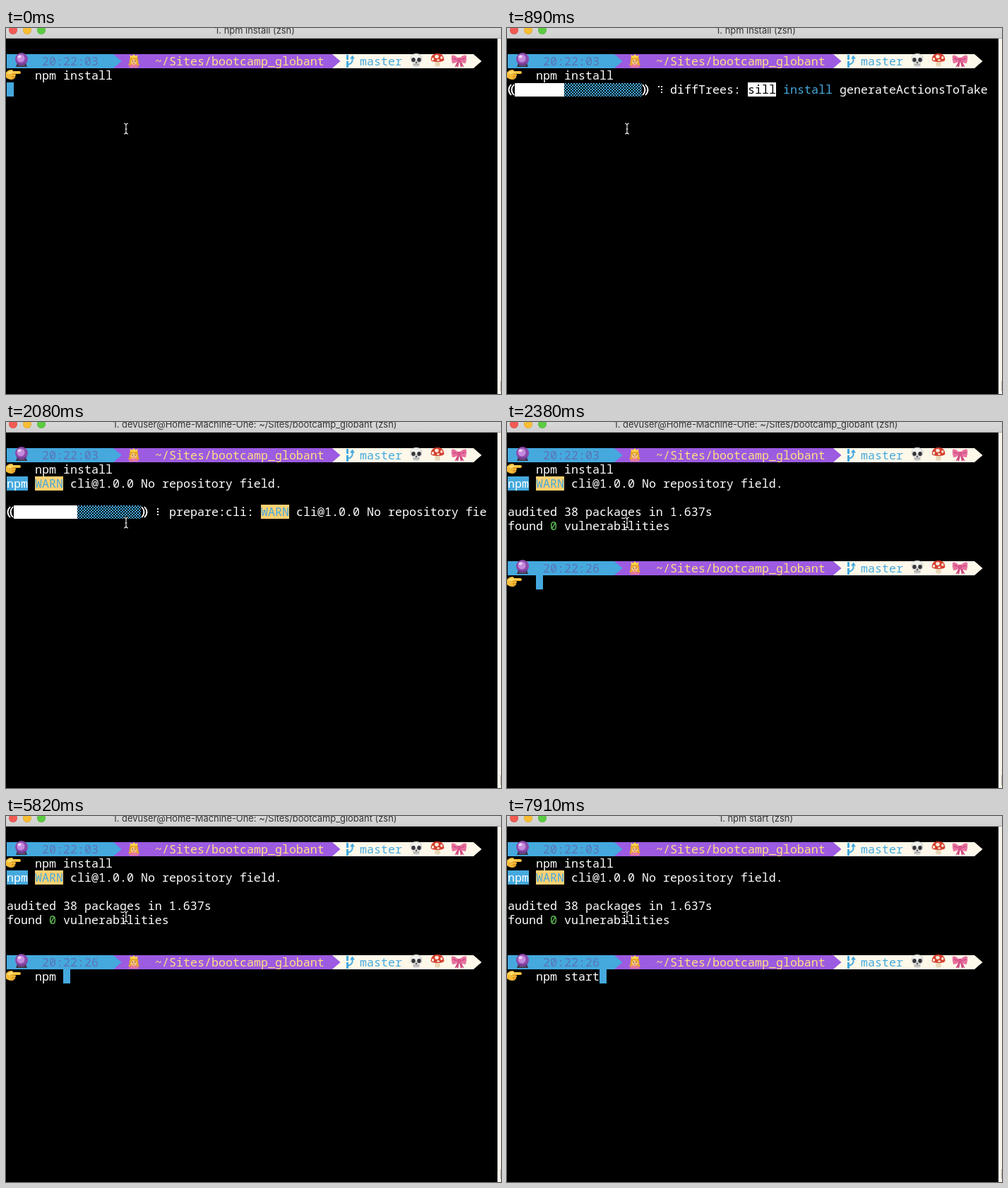
An HTML page with a canvas for the animation above (8000 ms loop, 701 by 518 pixels).

```html
<!DOCTYPE html>
<html lang="en">
<head>
<meta charset="utf-8">
<title>Terminal</title>
<style>
  html, body { margin: 0; width: 100%; height: 100%; overflow: hidden; background: #000; }
  canvas { display: block; }
</style>
</head>
<body>
<canvas id="stage" width="701" height="518"></canvas>
<script>
const ctx = document.getElementById('stage').getContext('2d');
const LOOP = 8000, CELL = 10, ROW = 20, LEFT = 1, TOP = 37;
const MONO = '500 16.667px "Noto Sans Mono", "DejaVu Sans Mono", monospace';
const BLUE = '#45a9de', PURPLE = '#9c5be1', CREAM = '#fdf8ea', YELLOW = '#fed172', WHITE = '#fff';

const colX = col => LEFT + col * CELL;
const rowY = row => TOP + row * ROW;

function rect(x, y, w, h, color) {
  ctx.fillStyle = color;
  ctx.fillRect(x, y, w, h);
}

function fillPath(path, color) {
  ctx.fillStyle = color;
  ctx.fill(new Path2D(path));
}

function strokePath(path, color, width) {
  ctx.strokeStyle = color;
  ctx.lineWidth = width;
  ctx.stroke(new Path2D(path));
}

function write(col, row, text, color = WHITE, back) {
  if (back) rect(colX(col), rowY(row), text.length * CELL, ROW, back);
  ctx.font = MONO;
  ctx.textAlign = 'left';
  ctx.fillStyle = color;
  ctx.fillText(text, colX(col), rowY(row) + 16);
  return col + text.length;
}

const oval = (x, y, rx, ry = rx) =>
  `M${x - rx} ${y}a${rx} ${ry} 0 1 0 ${2 * rx} 0a${rx} ${ry} 0 1 0 ${-2 * rx} 0z`;

// Each icon is a stack of filled paths in a 20 by 20 box.
const icons = {
  ball: [
    ['#3d3040', 'M4 14H16L18 19H2z'],
    ['#8c4aa8', oval(10, 8, 9)],
    ['#6d3590', 'M2 12Q10 18 18 12Q15 17.500 10 17Q5 17.500 2 12z'],
    ['#c48add', oval(9, 7, 5.5)],
    ['#f0d3f5', oval(7, 4.5, 2.6, 2)],
    ['#75608a', 'M5 16.500H15V17.500H5z']
  ],
  princess: [
    ['#e9a92b', 'M4 8Q4 2 10 2Q16 2 16 8Q16 13 18 16H2Q4 13 4 8z'],
    ['#e578a0', 'M3 19Q4 14 10 14Q16 14 17 19z'],
    ['#f8c98c', oval(10, 10, 4.3, 5)],
    ['#e9a92b', 'M5 10Q5 4 11 5Q15 6 15 10Q11 9 9 6.500Q8 9 5 10z'],
    ['#ffd74a', 'M5 5L4.500 1L7.500 3L10 0L12.500 3L15.500 1L15 5z'],
    ['#633a20', oval(8.3, 10, .8) + oval(11.8, 10, .8)],
    ['#c4513f', 'M8 12.500H12Q10 14.500 8 12.500z']
  ],
  skull: [
    ['#d9d9d6', 'M1.500 8Q1.500 0 10 0Q18.500 0 18.500 8Q18.500 12 15 13.500V17Q14 19 10 19Q6 19 5 17V13.500Q1.500 12 1.500 8z'],
    ['#f1f1ed', oval(9.5, 5, 6.5, 4)],
    ['#34343a', oval(6, 9, 2.7, 3) + oval(14, 9, 2.7, 3)],
    ['#34343a', 'M10 11L11.300 14H8.700z'],
    ['#77777a', 'M6 15.500H14V16.300H6z']
  ],
  mushroom: [
    ['#e8d6b5', 'M7 10H13L14 17Q10 20 6 17z'],
    ['#d6402f', 'M.5 9Q1 0 10 0Q19 0 19.500 9Q19 12 10 12Q1 12 .5 9z'],
    ['#f7eadb', oval(9, 4.5, 2.8, 2.4) + oval(15.8, 6, 1.7, 2.1) + oval(3.5, 8, 1.7, 1.9) + oval(11, 9.5, 2, 1.2)]
  ],
  bow: [
    ['#cf4c82', 'M9 9L4 19L7 17L9 19L11 10L13 19L15 17L18 19L13 9z'],
    ['#e8719f', 'M10 7Q4 0 0 2Q-1 7 1 13Q6 13 10 9Q15 13 20 13Q22 7 21 2Q17 0 10 7z'],
    ['#b93a70', 'M9 8L2 5L3 7zM12 8L19 5L18 7z'],
    ['#d9558b', oval(10.5, 8, 2.8, 3.2)]
  ],
  hand: [
    ['#f6bb36', 'M0 6Q3 2 8 2Q10 2 10 4H19Q21 4 21 6Q21 8 19 8H13Q15 10 13 11Q14 13 12 14Q11 16 8 16Q3 16 0 13z'],
    ['#ffdb6b', 'M2 6Q6 3 9 4L10 5H19V6H10L7 8H2z'],
    ['#b9761d', 'M7 9Q8 8 13 8V8.800H8zM8 11H13V11.800H8zM8 13.500H12V14.300H8z']
  ]
};

function icon(name, x, y) {
  ctx.save();
  ctx.translate(x, y);
  for (const [color, path] of icons[name]) fillPath(path, color);
  ctx.restore();
}

function segment(x, end, y, color) {
  fillPath(`M${x} ${y}H${end}L${end + 11.5} ${y + 10}L${end} ${y + 20}H${x}z`, color);
}

function branch(x, y) {
  ctx.save();
  ctx.translate(x, y);
  rect(1, 1, 3, 7, BLUE);
  rect(1, 10, 3, 9, BLUE);
  strokePath('M3 15Q9.500 13 9.500 9V5', BLUE, 2);
  fillPath('M6 6.500L9.500 1.500L13 6.500z', BLUE);
  ctx.restore();
}

function prompt(row, time) {
  const y = rowY(row);
  segment(462, 662, y, CREAM);
  segment(152, 462, y, PURPLE);
  segment(LEFT, 152, y, BLUE);
  icon('ball', 12, y - 1);
  write(5, row, time, '#5b74b3');
  icon('princess', 171, y);
  write(21, row, '~/Sites/bootcamp_globant', '#ffdf83');
  branch(481, y);
  write(50, row, 'master', BLUE);
  icon('skull', 571, y - 1);
  icon('mushroom', 601, y - 1);
  icon('bow', 631, y);
  icon('hand', 0, y + ROW);
}

const cursor = (col, row) => rect(colX(col), rowY(row), CELL, ROW, BLUE);

const checker = (() => {
  const tile = document.createElement('canvas');
  tile.width = tile.height = 4;
  const pen = tile.getContext('2d');
  pen.fillStyle = BLUE;
  pen.fillRect(0, 0, 2, 2);
  pen.fillRect(2, 2, 2, 2);
  return ctx.createPattern(tile, 'repeat');
})();

// Dots are listed as [column, line] inside the spinner cell.
const spinners = {
  start: [[0, 0], [1, 0], [0, 1], [0, 2]],
  turn: [[0, 0], [1, 0], [1, 1]],
  right: [[0, 0], [1, 0], [1, 1], [1, 2]],
  left: [[0, 0], [0, 1], [0, 2]]
};

function progress(row, filled, spinner, parts) {
  const y = rowY(row), end = colX(1 + filled);
  for (const dx of [0, 4]) {
    strokePath(`M${6 + dx} ${y + 3}Q${-1 + dx} ${y + 10.5} ${6 + dx} ${y + 18}`, WHITE, 1.8);
    strokePath(`M${192 + dx} ${y + 3}Q${199 + dx} ${y + 10.5} ${192 + dx} ${y + 18}`, WHITE, 1.8);
  }
  rect(11, y + 1, end - 11, 19, WHITE);
  rect(end, y + 1, 191 - end, 19, checker);
  for (const [c, l] of spinners[spinner]) rect(214 + 4 * c, y + 5 + 4 * l, 2, 2, WHITE);
  let col = 23;
  for (const [text, color, back] of parts) col = write(col, row, text, color, back);
}

const SILL = ['sill', '#000', WHITE], WARN = ['WARN', BLUE, YELLOW];
const stages = [
  [600, 2, 1, 'start', [['rollbackFailedOptional: '], ['verb', BLUE], [' npm-session 6fb9']]],
  [740, 2, 2, 'turn', [['loadIdealTree:loadAllDepsIntoIdealTree: '], SILL]],
  [890, 2, 7, 'right', [['diffTrees: '], SILL, [' '], ['install', BLUE], [' generateActionsToTake']]],
  [1190, 4, 9, 'left', [['prepare:cli: '], WARN, [' cli@1.0.0 No repository fie']]]
];

// Number of characters of the command on screen from each moment on.
const COMMAND = 'npm start';
const keys = [[2380, 0], [4480, 1], [4630, 2], [5080, 3], [5820, 4], [6720, 5], [7320, 6], [7470, 8], [7770, 9]];

const latest = (list, t) => list.filter(item => t >= item[0]).pop();

function windowFrame(title) {
  rect(696, 15, 5, 503, '#faf5ea');
  rect(700, 500, 1, 14, '#b9b6b0');
  const shade = ctx.createLinearGradient(0, 0, 0, 14);
  shade.addColorStop(0, '#d8d8d8');
  shade.addColorStop(1, '#d0d0d0');
  rect(0, 0, 701, 14, shade);
  rect(0, 14, 701, 1, '#a6a6a6');
  ['#f25a54', '#f8bd32', '#5bcb42'].forEach((color, i) => {
    fillPath(oval(10 + 20 * i, 3, 6), color);
    strokePath(oval(10 + 20 * i, 3, 5.7), 'rgba(0,0,0,.13)', .7);
  });
  ctx.font = '12.9px Inter, Roboto, sans-serif';
  ctx.textAlign = 'center';
  ctx.fillStyle = '#353535';
  ctx.fillText(title, 352.5, 8);
}

function pointer() {
  const beam = 'M167 135Q170 135 170 138V147Q170 150 167 150M173 135Q170 135 170 138M170 147Q170 150 173 150M168.500 143H171.500';
  strokePath(beam, '#000', 3);
  strokePath(beam, '#eee', 1.1);
}

function draw(t) {
  rect(0, 0, 701, 518, '#000');
  windowFrame(t < 2080 ? '1. npm install (zsh)'
    : t < 7910 ? '1. devuser@Home-Machine-One: ~/Sites/bootcamp_globant (zsh)'
    : '1. npm start (zsh)');
  prompt(0, '20:22:03');
  write(4, 1, 'npm install');

  if (t < 600) cursor(0, 2);
  else if (t < 2230) progress(...latest(stages, t).slice(1));

  if (t >= 1190) {
    write(0, 2, 'npm', WHITE, BLUE);
    write(4, 2, ...WARN);
    write(9, 2, 'cli@1.0.0 No repository field.');
  }
  if (t >= 2230) {
    write(0, 4, 'audited 38 packages in 1.637s');
    write(0, 5, 'found   vulnerabilities');
    write(6, 5, '0', '#66c95c');
    if (t < 2380) cursor(0, 7);
  }
  if (t >= 2380) {
    prompt(8, '20:22:26');
    const typed = latest(keys, t)[1];
    write(4, 9, COMMAND.slice(0, typed));
    cursor(4 + typed, 9);
  }
  pointer();
}

const began = performance.now();
function tick() {
  draw((performance.now() - began) % LOOP);
  requestAnimationFrame(tick);
}
tick();
</script>
</body>
</html>
```
